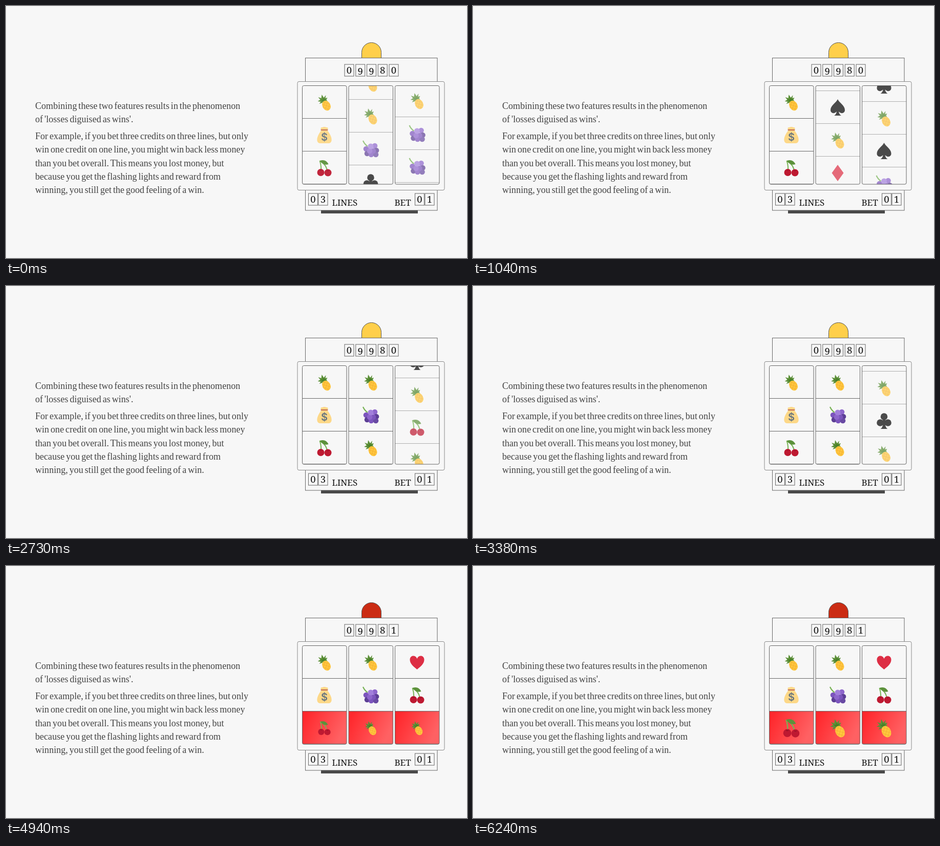
An HTML page that plays this animation: 900x492 px, repeating every 7240 ms.

```html
<!DOCTYPE html>
<html lang="en">
<head>
<meta charset="utf-8">
<title>Losses disguised as wins</title>
<style>
  html, body { margin: 0; width: 100%; height: 100%; overflow: hidden; background: #f7f7f7; }
  svg { display: block; }
  .copy { font: 18.1px "Liberation Serif", serif; word-spacing: -1.6px; fill: #444; }
  .label { font: 17px "Noto Serif", serif; fill: #111; }
  .digit { font: 18.5px "Noto Serif", serif; fill: #111; text-anchor: middle; }
  .outline { fill: none; stroke: #666; }
</style>
</head>
<body>
<svg width="900" height="492" viewBox="0 0 900 492">
  <defs>
    <linearGradient id="glow" x2="1" y2=".35">
      <stop offset=".1" stop-color="#ff1f24"/>
      <stop offset="1" stop-color="#ff5a5c"/>
    </linearGradient>
    <clipPath id="digitClip"><rect x="748.5" y="114.5" width="17" height="22"/></clipPath>

    <g id="pineapple">
      <path fill="#5c9038" d="M2 0L-4 1L-10 3L-7-1L-13-2L-8-5L-12-10L-6-8L-5-15L-1-9L3-14L2-8L6-9L4-5L6-2Z"/>
      <path fill="#4a8029" d="M0 0L-5-3L-7-6L-3-5L-3-10L0-6L2-8L2-3Z"/>
      <g transform="translate(4 6.5) rotate(-28)">
        <ellipse rx="7.8" ry="10.3" fill="#ffc83d"/>
        <path d="M-6-6L6 6M-7 0L2 9M-2-9L7 0M6-6L-6 6M7 0L-2 9M2-9L-7 0" stroke="#f4ae35" stroke-width=".8"/>
      </g>
    </g>
    <g id="bag">
      <path fill="#fdd888" d="M-6-9Q-9-16-4-15Q0-17 4-15Q9-16 6-9C10-4 15 4 14 11Q13 16 8 16H-8Q-13 16-14 11C-15 4-10-4-6-9Z"/>
      <path d="M-6-10H6" stroke="#bf6952" stroke-width="2.2" stroke-linecap="round"/>
      <text y="11" text-anchor="middle" font-family="Inter, sans-serif" font-size="20" font-weight="600" fill="#67757f">$</text>
    </g>
    <g id="cherry">
      <path d="M-9-14Q-5-2-7 9M-8-13Q5-6 6 9" fill="none" stroke="#77b255" stroke-width="2"/>
      <path fill="#5c913b" d="M-9-14Q3-18 8-7Q-2-4-9-14Z"/>
      <circle cx="-7" cy="9" r="7" fill="#be1931"/>
      <circle cx="7" cy="9.5" r="7" fill="#be1931"/>
      <path d="M-9 4Q-7 6-5 4M5 5Q7 7 9 5" fill="none" stroke="#8b1025"/>
    </g>
    <g id="grape">
      <path d="M-15-16Q-12-9-6-5" fill="none" stroke="#77b255" stroke-width="2.2"/>
      <g fill="#7c55bd">
        <circle cx="-9" cy="0" r="5.3"/><circle cx="8" cy="-6" r="5.3" fill="#8e66cc"/>
        <circle cx="-7" cy="9" r="5.3" fill="#5d3f95"/><circle cx="11" cy="3" r="5.3" fill="#5d3f95"/>
        <circle cx="1" cy="11" r="5.3"/><circle cx="10" cy="11" r="5.3" fill="#694aa3"/>
        <circle cx="5" cy="4" r="5.3"/><circle cx="-2" cy="4" r="5.3" fill="#8e66cc"/>
        <circle cx="0" cy="-5" r="5.5" fill="#a27fdb"/>
      </g>
    </g>
    <path id="spade" d="M0-16C3-9 14-4 14 5C14 12 6 13 2 8Q3 14 7 16H-7Q-3 14-2 8C-6 13-14 12-14 5C-14-4-3-9 0-16Z"/>
    <g id="club">
      <circle cy="-8" r="6.8"/><circle cx="-7.5" cy="4" r="6.8"/><circle cx="7.5" cy="4" r="6.8"/>
      <path d="M-3-4H3L2 6Q3 14 7 16H-7Q-3 14-2 6Z"/>
    </g>
    <path id="diamond" fill="#dd2e44" d="M0-16L11.5 0L0 16L-11.5 0Z"/>
    <path id="heart" fill="#dd2e44" d="M0 14C-6 9-14 3-14-5C-14-14-3-15 0-7C3-15 14-14 14-5C14 3 6 9 0 14Z"/>
  </defs>

  <rect width="900" height="492" fill="#f7f7f7"/>
  <g class="copy">
    <text x="57" y="200.5">Combining these two features results in the phenomenon</text>
    <text x="57" y="227">of 'losses diguised as wins'.</text>
    <text x="57" y="259.5">For example, if you bet three credits on three lines, but only</text>
    <text x="57" y="286">win one credit on one line, you might win back less money</text>
    <text x="57" y="312.5">than you bet overall. This means you lost money, but</text>
    <text x="57" y="339">because you get the flashing lights and reward from</text>
    <text x="57" y="365">winning, you still get the good feeling of a win.</text>
  </g>

  <path id="lamp" d="M694.5 101.5V90.5a19 19 0 0 1 38 0V101.5Z" stroke="#555"/>
  <g class="outline">
    <rect x="584.5" y="101.5" width="257.5" height="46"/>
    <rect x="584.5" y="359.5" width="257.5" height="39.5"/>
    <rect x="569" y="147.5" width="287" height="212" rx="3" stroke="#888"/>
  </g>
  <rect x="615" y="399" width="189" height="6" fill="#4a4a4a"/>
  <text class="label" x="636.5" y="390">LINES</text>
  <text class="label" x="758.5" y="390">BET</text>
  <g id="machine"></g>
</svg>

<script>
const STEP = 130, LOOP = 7240, LAST = 6240, CELL = 64, TOP = 156;
const WIN_LAMP = 3900, WIN_ROW = 4030, COUNT_START = 4160;
const machine = document.getElementById('machine');
const lamp = document.getElementById('lamp');

// path: [time, pixels left to travel]; strip runs downwards from the final top row
const reels = [
  { x: 578.5, strip: 'pineapple bag cherry', path: [[-180, 0]] },
  { x: 669, strip: 'pineapple grape pineapple spade pineapple diamond pineapple pineapple grape club',
    path: [[0, 421], [1040, 182], [1930, 0]] },
  { x: 759.5, strip: 'heart cherry pineapple club pineapple cherry pineapple bag spade pineapple spade grape pineapple grape grape',
    path: [[0, 771], [1040, 545], [2080, 347], [3380, 117], [3900, 0]] }
];

function add(parent, tag, attrs, text) {
  const el = document.createElementNS('http://www.w3.org/2000/svg', tag);
  for (const name in attrs) el.setAttribute(name, attrs[name]);
  if (text !== undefined) el.textContent = text;
  parent.appendChild(el);
  return el;
}

function addDigit(x, y, value, parent = machine) {
  return add(parent, 'text', { class: 'digit', x, y: y + (value === '9' ? 2 : 0) }, value);
}

function addBox(x, y) {
  add(machine, 'rect', { class: 'outline', x: x - 9, y: y - 11.5, width: 18, height: 23 });
}

[['0', 599.5], ['3', 619], ['0', 807.5], ['1', 827]].forEach(([value, x]) => {
  addBox(x, 377.5);
  addDigit(x, 384, value);
});
[...'0998'].forEach((value, i) => {
  addBox(670 + i * 21.75, 125.5);
  addDigit(670 + i * 21.75, 132, value);
});
addBox(757, 125.5);
const rollClip = add(machine, 'g', { 'clip-path': 'url(#digitClip)' });
const roll = add(rollClip, 'g', {});
addDigit(757, 132, '0', roll);
addDigit(757, 152, '1', roll);

reels.forEach((reel, i) => {
  const shape = { x: reel.x, y: 155.5, width: 86.5, height: 192.5, rx: 3 };
  const clip = add(machine, 'clipPath', { id: 'reel' + i });
  add(clip, 'rect', shape);
  const view = add(machine, 'g', { 'clip-path': `url(#reel${i})` });
  reel.glow = add(view, 'rect', { x: reel.x, y: 284, width: 87, height: 64, fill: 'url(#glow)' });
  reel.group = add(view, 'g', {});
  reel.lines = add(reel.group, 'g', { stroke: '#666' });
  reel.cx = reel.x + 43;
  reel.strip.split(' ').forEach((name, n) => {
    const y = TOP + CELL * (n + 0.5);
    const symbol = add(reel.group, 'use', { href: '#' + name, transform: `translate(${reel.cx} ${y})` });
    if (n === 2) reel.winner = symbol;
    add(reel.lines, 'path', { d: `M${reel.x} ${y + 31.5}h87` });
  });
  add(machine, 'rect', { ...shape, class: 'outline' });
});

const clamp = v => Math.max(0, Math.min(1, v));

function distanceLeft(path, t) {
  for (let i = 1; i < path.length; i++) {
    const [t0, d0] = path[i - 1], [t1, d1] = path[i];
    if (t < t1) return d0 + (d1 - d0) * (t - t0) / (t1 - t0);
  }
  return 0;
}

function draw(t) {
  const won = t >= WIN_ROW, age = t - WIN_ROW;
  const glow = won ? 0.85 + 0.15 * Math.cos(2 * Math.PI * age / 1040) : 0;
  const scale = won ? 1 - 0.16 * Math.sin(2 * Math.PI * age / 2600) : 1;

  for (const reel of reels) {
    const stop = reel.path[reel.path.length - 1][0];
    const opacity = 0.7 + 0.3 * clamp((t - stop) / 220);
    reel.group.setAttribute('transform', `translate(0 ${-distanceLeft(reel.path, t)})`);
    reel.group.setAttribute('opacity', opacity);
    reel.lines.setAttribute('opacity', opacity);
    reel.glow.setAttribute('opacity', glow);
    reel.winner.setAttribute('transform', `translate(${reel.cx} ${TOP + CELL * 2.5}) scale(${scale})`);
  }

  lamp.setAttribute('fill', t < WIN_LAMP ? '#ffcf4a' : '#cb2c14');
  const p = clamp((t - COUNT_START) / 650);
  roll.setAttribute('transform', `translate(0 ${-20 * p * p * (3 - 2 * p)})`);
}

function tick() {
  const t = performance.now() % LOOP;
  draw(Math.min(LAST, Math.floor(t / STEP) * STEP));
  requestAnimationFrame(tick);
}
tick();
</script>
</body>
</html>
```
